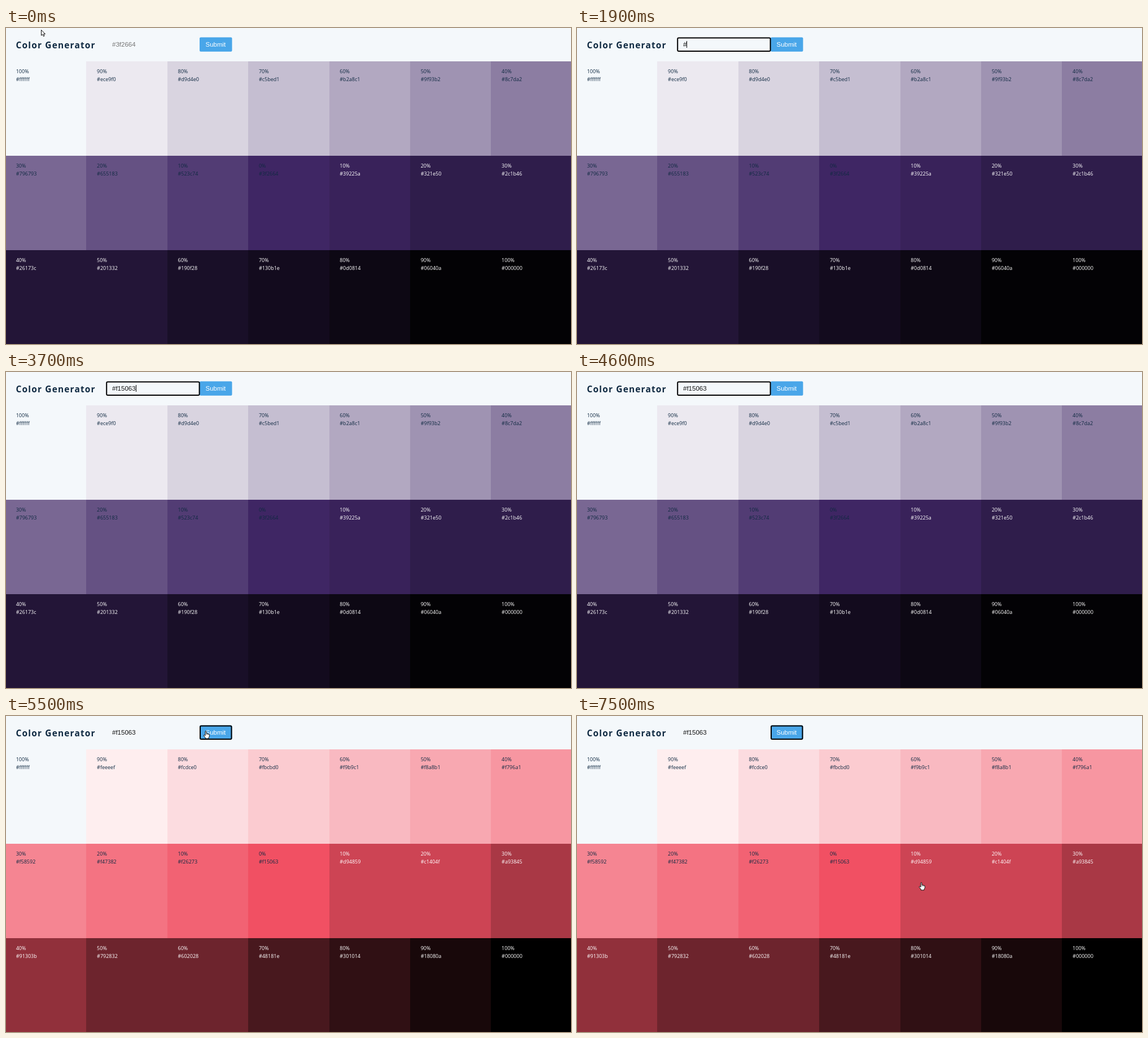
These frames come from a looping animation (1001x559 px, 8 s). An HTML page with a canvas:

```html
<!DOCTYPE html>
<html lang="en">
<head>
<meta charset="utf-8">
<title>Color Generator</title>
<style>
  html, body { margin: 0; width: 100%; height: 100%; overflow: hidden; background: #f4f8fb; }
  canvas { display: block; }
</style>
</head>
<body>
<canvas id="stage" width="1001" height="559"></canvas>
<script>
const ctx = document.getElementById('stage').getContext('2d');
const LOOP = 8000;
const PAGE = '#f4f8fb';
const INK = '#102a42';
const UI_FONT = '11.5px "Liberation Sans", Arial, sans-serif';

// Neighbouring swatches in `pairs` share one averaged fill.
const PURPLE = makePalette([63, 38, 100], [12, 14, 19]);
const RED = makePalette([241, 80, 99], [11, 15]);

// [time, text, caret starts visible]
const TYPING = [
  [800, ''], [1900, '#'], [2400, '#f'], [2600, '#f1'], [2900, '#f15'],
  [3300, '#f150'], [3500, '#f1506'], [3700, '#f15063']
];

function makePalette(base, pairs) {
  const swatches = Array.from({ length: 21 }, (_, i) => {
    const step = Math.abs(10 - i);
    const end = i < 10 ? 255 : 0;
    const rgb = base.map(c => Math.round((c * (10 - step) + end * step) / 10));
    const hex = '#' + rgb.map(c => c.toString(16).padStart(2, '0')).join('');
    return { percent: step * 10 + '%', hex, rgb, fill: i ? hex : PAGE };
  });
  for (const i of pairs) {
    const [a, b] = [swatches[i], swatches[i + 1]];
    a.fill = b.fill = `rgb(${a.rgb.map((c, k) => Math.round((c + b.rgb[k]) / 2))})`;
  }
  return swatches;
}

function text(str, x, y, font, color, spacing = 0) {
  ctx.font = font;
  ctx.fillStyle = color;
  ctx.letterSpacing = spacing + 'px';
  ctx.fillText(str, x, y);
}

function roundBox(x, y, w, h, r, fill, stroke) {
  ctx.beginPath();
  ctx.roundRect(x, y, w, h, r);
  if (fill) { ctx.fillStyle = fill; ctx.fill(); }
  if (stroke) { ctx.strokeStyle = stroke; ctx.lineWidth = 2; ctx.stroke(); }
}

function drawSwatches(palette) {
  const edge = col => Math.round(143.4 * col - 1);
  palette.forEach((s, i) => {
    const col = i % 7, row = Math.floor(i / 7);
    const top = [59, 226, 393][row];
    ctx.fillStyle = s.fill;
    ctx.fillRect(edge(col), top, edge(col + 1) - edge(col), 167);
    const x = 17.7 + 143.4 * col;
    const font = '9px "Open Sans", "Noto Sans", sans-serif';
    const color = i > 10 ? '#fff' : INK;
    text(s.percent, x, top + 20.5, font, color);
    text(s.hex, x, top + 35, font, color);
  });
}

function drawForm(t) {
  const typed = TYPING.filter(k => k[0] <= t).pop();
  const inputFocused = typed && t < 5400;

  roundBox(343, 16.5, 57.5, 25.2, 2, '#49a6e9');
  text('Submit', 353.5, 33, UI_FONT, '#fff');
  if (t >= 5400) roundBox(344, 17.5, 55.5, 23.5, 2, null, '#000');
  if (inputFocused) roundBox(178.2, 17.4, 164.4, 23.6, 2, null, '#000');

  const value = typed ? typed[1] : '';
  text(value || '#3f2664', 188, 33, UI_FONT, value ? '#111' : '#757575');
  if (inputFocused && Math.floor((t - typed[0]) / 500) % 2 === 0) {
    const x = 188 + (value ? ctx.measureText(value).width : 0);
    ctx.fillStyle = '#000';
    ctx.fillRect(Math.round(x), 23, 1, 12);
  }
}

function pointerShape(path, x, y) {
  ctx.save();
  ctx.translate(x, y);
  const shape = new Path2D(path);
  ctx.fillStyle = '#fff';
  ctx.strokeStyle = '#111';
  ctx.lineWidth = 1;
  ctx.lineJoin = 'round';
  ctx.fill(shape);
  ctx.stroke(shape);
  ctx.restore();
}

function drawArrow(x, y) {
  pointerShape('M.5 .5V10.2L2.8 8.2L4.4 11.8L6.1 11L4.6 7.6H7.5Z', x, y);
}

function drawHand(x, y) {
  pointerShape('M-1 1.2Q0 -.2 1 1.2V5Q2 4.2 2.8 5.4Q3.8 4.7 4.6 5.9Q6.2 5.5 6.3 7.2' +
    'V10.2L5 12.4V14H-.6V12.6L-3.4 9.2Q-4.2 7.4 -2.6 7.4L-1 8.8Z', x, y);
  ctx.strokeStyle = '#111';
  ctx.lineWidth = 0.6;
  ctx.beginPath();
  for (const dx of [1, 2.8, 4.6]) {
    ctx.moveTo(x + dx, y + 5.4);
    ctx.lineTo(x + dx, y + 7.4);
  }
  ctx.stroke();
}

function drawBeam(x, y) {
  ctx.fillStyle = '#222';
  ctx.fillRect(x, y - 6, 1, 12);
  ctx.fillRect(x - 2, y - 6, 5, 1);
  ctx.fillRect(x - 2, y + 5, 5, 1);
}

function glide(t, start, from, to) {
  const p = Math.min(1, Math.max(0, (t - start) / 900));
  const e = p * p * (3 - 2 * p);
  return from.map((v, i) => Math.round(v + (to[i] - v) * e));
}

function drawPointer(t) {
  if (t < 1900) {
    const [x, y] = glide(t, 0, [62, 3], [220, 29]);
    (x < 178 ? drawArrow : drawBeam)(x, y);
  } else if (t >= 4800) {
    drawHand(...glide(t, 6600, [354, 26], [610, 294]));
  } else if (t >= 4700) {
    drawBeam(220, 29);
  }
}

function frame(now) {
  const t = Math.floor(now % LOOP / 100) * 100;
  ctx.fillStyle = PAGE;
  ctx.fillRect(0, 0, 1001, 559);
  text('Color Generator', 17.5, 36, 'bold 15.5px "Open Sans", "Noto Sans", sans-serif', INK, 1.15);
  drawSwatches(t < 5500 ? PURPLE : RED);
  drawForm(t);
  drawPointer(t);
  requestAnimationFrame(frame);
}
requestAnimationFrame(frame);
</script>
</body>
</html>
```
